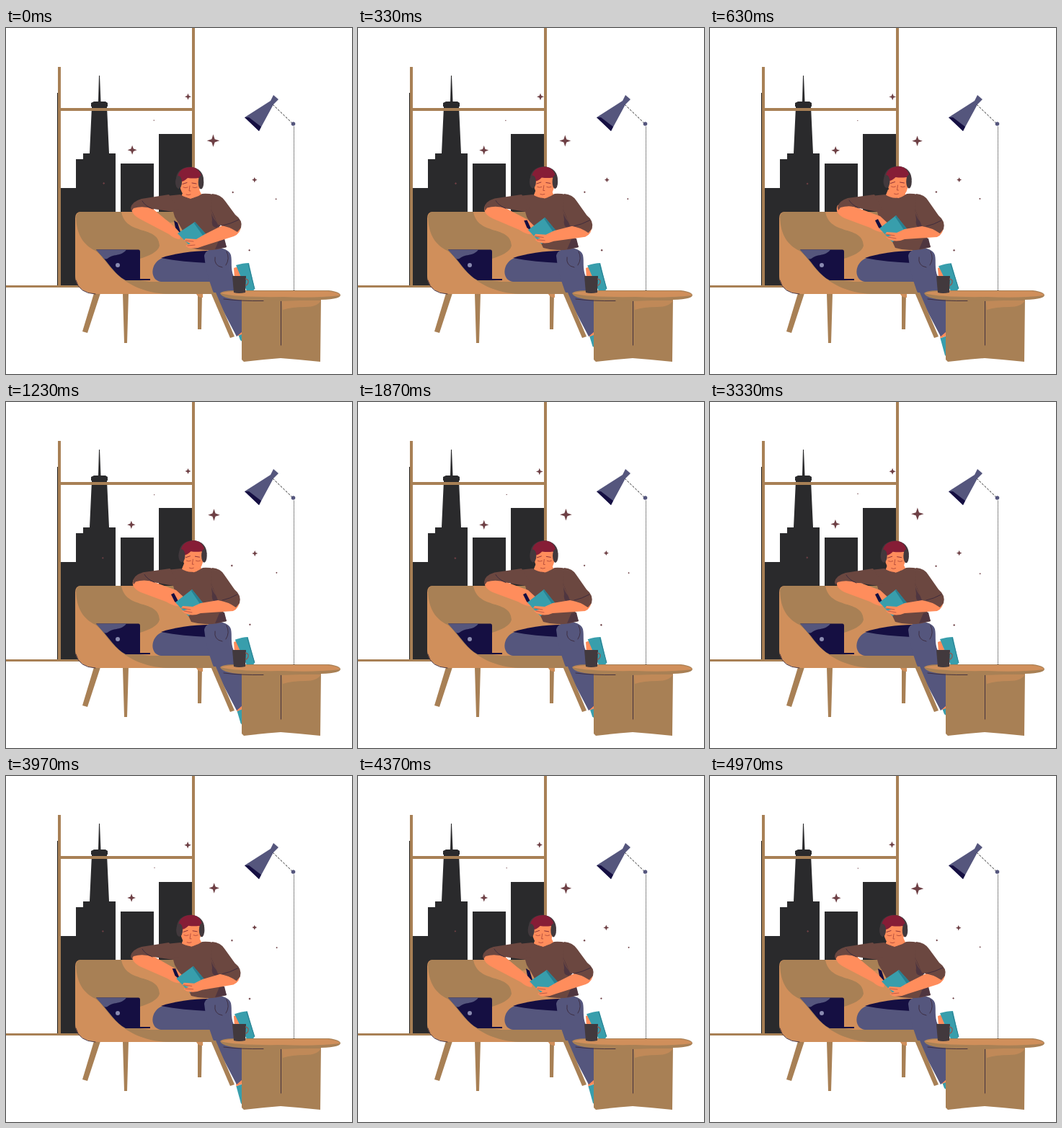
Write an HTML page that moves like this. It is 480 px wide and 480 px high and loops after 5 s.

```html
<!DOCTYPE html>
<html>
<head>
<meta charset="utf-8">
<title>Reading on the sofa</title>
<style>
html, body { margin: 0; width: 100%; height: 100%; overflow: hidden; background: #fff; }
svg { display: block; width: 100vw; height: 100vh; }
.tan { fill: #a88055; }
.gold { fill: #d08f5b; }
.city { fill: #2a2a2c; }
.slate { fill: #55567d; }
.navy { fill: #150f42; }
.skin { fill: #ff8d5c; }
.shirt { fill: #6b4740; }
.shade { fill: #4f3640; }
.teal { fill: #389eac; }
.grey { fill: #42393d; }
.hair { fill: #861d36; }
.star { fill: #6e4045; }
.line { fill: none; stroke: #3b2b3d; stroke-width: .9; stroke-linecap: round; }
.wire { fill: none; stroke: #222; stroke-width: 1; }
</style>
</head>
<body>
<svg viewBox="0 0 480 480">
  <!-- window and skyline -->
  <path class="city" d="M76 222H97V182H107V174H116L119 109H118V104L122 102H128L129 66H130L131.5 102H138L141 104V109H140L143 174H152V357H76ZM159 188H205V257H159ZM212 147H258V260H212Z"/>
  <path class="wire" d="M71.5 90V357"/>
  <path class="tan" d="M72 54H76V359H72ZM258 0H262V200H258ZM76 111H258V115H76ZM0 357H104V360H0Z"/>

  <!-- lamp -->
  <path class="wire" stroke-dasharray="1 1" d="M399.5 137V364"/>
  <path class="wire" stroke-dasharray="3 2" d="M370 106L397 132"/>
  <path class="slate" d="M331 124L367 101L371 93L378 99L371 106L351 143Z"/>
  <path class="navy" d="M331 124L337 124L354 137L351 143Z"/>
  <circle class="slate" cx="398.500" cy="133" r="2.8"/>

  <!-- sofa -->
  <path class="tan" d="M122 368H131L113 423L106 421ZM162 368H170L168 437H164ZM266 368H272L271 418H266Z"/>
  <path class="gold" d="M104 255H262L290 300V369H124C106 367 96 358 96 344V264Q96 255 104 255Z"/>
  <path class="tan" d="M104 255H160C166 289 212 273 213 302C211 311 198 316 186 320V350L200 352H290V369H225C190 368 165 354 148 336C136 322 131 314 124 309C108 301 98 288 97 262Q98 256 104 255ZM205 255H232L238 268L228 270Z"/>
  <path class="gold" d="M264 369Q266 374 273 374V369Z"/>
  <path class="line" d="M97 350Q101 368 124 369"/>
  <path class="navy" d="M125 307.500H184Q186 307.500 186 310V348H200V350H166C150 342 140 322 125 307.500Z"/>
  <path class="slate" d="M125 307.500H167C160 317 150 313 142 319Q138 322 135 319Z"/>
  <circle cx="155" cy="329" r="3" fill="#8a8bb0"/>

  <!-- legs -->
  <path class="slate" d="M215 320C230 315 260 311 285 312L294 352H215C199 350 200 327 215 320Z"/>
  <path class="navy" d="M215 319C232 313 260 309 282 309L279 326C258 325 236 323 215 319Z"/>
  <path id="shoeB" class="teal"/>
  <path id="ankleB" class="skin"/>
  <path class="slate" d="M275 316C277 303 307 301 312 315C314 324 311 333 316 345L328 366V421L320 428L287 365Q277 338 275 316Z"/>
  <path class="line" d="M290 318Q288 330 300 332M306 310Q311 320 305 329"/>
  <path class="tan" d="M284 367H291L317 428L311 430Z"/>

  <!-- reader -->
  <path class="skin" d="M247 224H268L272 233Q260 245 243 234Z"/>
  <path class="shirt" id="torso"/>
  <path class="shade" d="M284 249C284 262 291 268 297 274L292 277Q284 276 286 266ZM296 293L303 292L306 304L290 307Z"/>
  <path class="line" d="M285 248Q287 262 297 275"/>
  <path id="armL" class="skin"/>
  <path id="sleeveL" class="shirt"/>
  <path id="cuffL" class="line"/>
  <path id="cover" class="navy"/>
  <path id="book" class="teal"/>
  <path id="fold" fill="#287f91"/>
  <path id="armR" class="skin"/>
  <path id="fingers" class="line" style="stroke:#b95542"/>
  <path id="sleeveR" class="shirt"/>
  <path id="cuffR" class="line"/>
  <g id="head">
    <path class="grey" d="M236 212C234 187 275 186 274 212L267 219H243Z"/>
    <path class="skin" d="M242 209Q255 200 269 209V222Q266 235 256 237Q245 234 242 223Z"/>
    <path class="hair" d="M238 211C238 196 248 193 257 193Q270 194 272 211L267 208Q260 209 252 208Q247 213 243 213V218H240Z"/>
    <ellipse class="grey" cx="239.500" cy="214" rx="4.500" ry="9"/>
    <ellipse class="grey" cx="270.500" cy="214" rx="3.800" ry="9.500"/>
    <path class="line" style="stroke:#7e2a35" d="M245 216.500L251 214.500M258 215L264 216"/>
    <path class="line" style="stroke:#b04a3a" d="M246 221Q249 222.500 252 221M259 221Q262 222.500 265 221M255 219L254 226H256M250 231Q253 232.500 256 231"/>
  </g>

  <!-- raised foot, table, mug -->
  <path class="skin" d="M316 333L322 331L326 347H317Z"/>
  <g id="shoeA">
    <path class="teal" d="M319 329Q329 326 337 326L345 362Q342 367 334 365Z"/>
    <path d="M336 327L345 362" fill="none" stroke="#287f91"/>
  </g>
  <path class="tan" d="M327 374H437L436 463Q408 460 381 458Q354 460 330 463L327 460Z"/>
  <path class="gold" opacity=".6" d="M383 378H437Q432 387 415 387Q396 387 384 391Z"/>
  <path class="line" d="M381.500 379V440"/>
  <path class="tan" d="M297 368Q300 364 320 364H448Q464 366 464 371Q462 377 430 377Q380 380 340 378Q300 377 297 368Z"/>
  <path class="gold" d="M298 368Q303 365 330 365H446Q463 367 463 371Q430 375 385 373Q320 374 298 368Z"/>
  <path class="line" d="M302 376Q325 379 357 378.500"/>
  <path class="grey" d="M314 344H333L332 367Q323 369 316 367Z"/>
  <path d="M332 348Q337 349 336 353Q335 357 332 357" fill="none" stroke="#8a5a55" stroke-width="1.300"/>
  <g id="stars"></g>
</svg>
<script>
const LOOP = 5000, TAU = 2 * Math.PI;
const $ = id => document.getElementById(id);
const smooth = k => k * k * (3 - 2 * k);

// value of a keyed track at time t
function track(keys, t, ease = k => k) {
  const i = Math.max(1, keys.findIndex(k => k[0] >= t));
  const [t0, a] = keys[i - 1], [t1, b] = keys[i];
  return a + (b - a) * ease((t - t0) / (t1 - t0));
}

// blend two paths of equal structure
function blend(a, b, k) {
  const to = b.match(/-?[\d.]+/g);
  let i = 0;
  return a.replace(/-?[\d.]+/g, n => (+n + (to[i++] - n) * k).toFixed(2));
}

const lean = [[0, 0], [630, 1], [1230, .8], [2570, .4], [3330, .3], [3970, .2], [LOOP, 0]];
const elbow = [[0, 0], [630, 1], [1230, .75], [2570, .2], [3330, 0], [LOOP, 0]];
const hold = [[0, 0], [530, 1], [3700, 1], [4300, 0], [LOOP, 0]];

// parts driven by: h = how the book is held, e = elbow shift, f = foot tap
const parts = {
  torso: ["e", "M242 231Q256 241 272 230Q288 229 296 235L308 254L296 275L306 304Q280 312 257 305Q248 285 234 262L232 255L205 251L189 238Q218 233 242 231Z",
               "M243 231Q258 241 273 230Q288 229 296 235L308 254L296 275L306 304Q280 312 257 305Q248 285 234 262L232 255L207 250L192 237Q219 233 243 231Z"],
  armL: ["h", "M175 246Q171 257 186 265L226 286Q234 293 241 293L243 286L235 277L204 251L184 243Z",
              "M177 246Q172 257 187 264L222 277Q234 284 240 283L248 272L236 261L206 250L184 243Z"],
  sleeveL: ["e", "M173 250Q174 241 188 237L226 231L240 252L204 251Q190 246 177 250L174 254Z",
                 "M177 249Q178 240 191 236L228 231L240 252L208 250Q194 245 181 249L178 253Z"],
  cuffL: ["e", "M189 240Q192 246 203 251", "M193 239Q196 245 207 250"],
  cover: ["h", "M233 267L238 270L243 286L235 277Z", "M229 267L233 265L242 282L234 277Z"],
  book: ["h", "M262 269L280 289L258 305L238 285Z", "M258 260L275 281L253 297L235 278Z"],
  fold: ["h", "M262 269L280 289L276 292L261 271Z", "M258 260L275 281L271 283L257 262Z"],
  armR: ["h", "M326 273Q326 285 316 289L275 302Q264 307 253 305L249 302L256 299L247 295L249 292L264 293L276 286L300 274Z",
              "M324 274Q324 286 315 290L270 293Q258 298 248 293L244 290L252 288L243 286L245 283L259 284L270 279L300 274Z"],
  fingers: ["h", "M249 295L260 296M252 302L262 301", "M245 286L256 288M247 290L258 292"],
  sleeveR: ["h", "M286 230Q298 231 304 240L318 259Q329 267 326 277L321 283Q309 275 294 273L284 250Z",
                 "M286 230Q298 231 303 240L317 260Q327 268 324 279L319 285Q308 277 294 275L284 250Z"],
  cuffR: ["h", "M300 274Q311 272 323 266", "M300 275Q310 273 321 267"],
  shoeB: ["f", "M322 425L328 422L329 436L325 433Z", "M319 431L328 428L331 463L326 457Z"],
  ankleB: ["f", "M320 423L327 420V425L322 427Z", "M319 426L327 421V428L319 431Z"]
};

// x, y, radius; small ones are dots
const stars = [[252.5, 96, 4.5], [174.5, 169.7, 6], [288, 156, 8], [345, 210, 3.7],
  [314, 227.5, 1.5], [375, 237.5, 1.1], [338, 309, 1.5], [135, 216, 1.5], [205.5, 128, .6]];
const starEls = stars.map(() => {
  const el = document.createElementNS("http://www.w3.org/2000/svg", "path");
  el.setAttribute("class", "star");
  return $("stars").appendChild(el);
});

function starPath(x, y, r) {
  const q = .4 + r * .2;
  return `M${x} ${y - r}L${x + q} ${y - q}L${x + r} ${y}L${x + q} ${y + q}` +
    `L${x} ${y + r}L${x - q} ${y + q}L${x - r} ${y}L${x - q} ${y - q}Z`;
}

function draw(now) {
  const t = now % LOOP, u = TAU * t / LOOP;
  const pose = {
    h: track(hold, t, smooth),
    e: track(elbow, t),
    f: (1 - Math.cos(3 * u)) / 2
  };
  for (const id in parts) {
    const [key, a, b] = parts[id];
    $(id).setAttribute("d", blend(a, b, pose[key]));
  }
  const l = track(lean, t);
  $("head").setAttribute("transform", `translate(${5.5 * l} ${-l})`);
  $("shoeA").setAttribute("transform", `rotate(${-4 * pose.f} 338 363)`);
  stars.forEach(([x, y, r], i) => {
    const dx = .7 * Math.sin(2 * u + i * 2), dy = -.7 * Math.cos(u + i);
    starEls[i].setAttribute("d", starPath(x + dx, y + dy, r * (1 + .1 * Math.sin(3 * u + i))));
  });
}

const start = performance.now();
function tick() {
  draw(performance.now() - start);
  requestAnimationFrame(tick);
}
draw(0);
requestAnimationFrame(tick);
</script>
</body>
</html>
```
